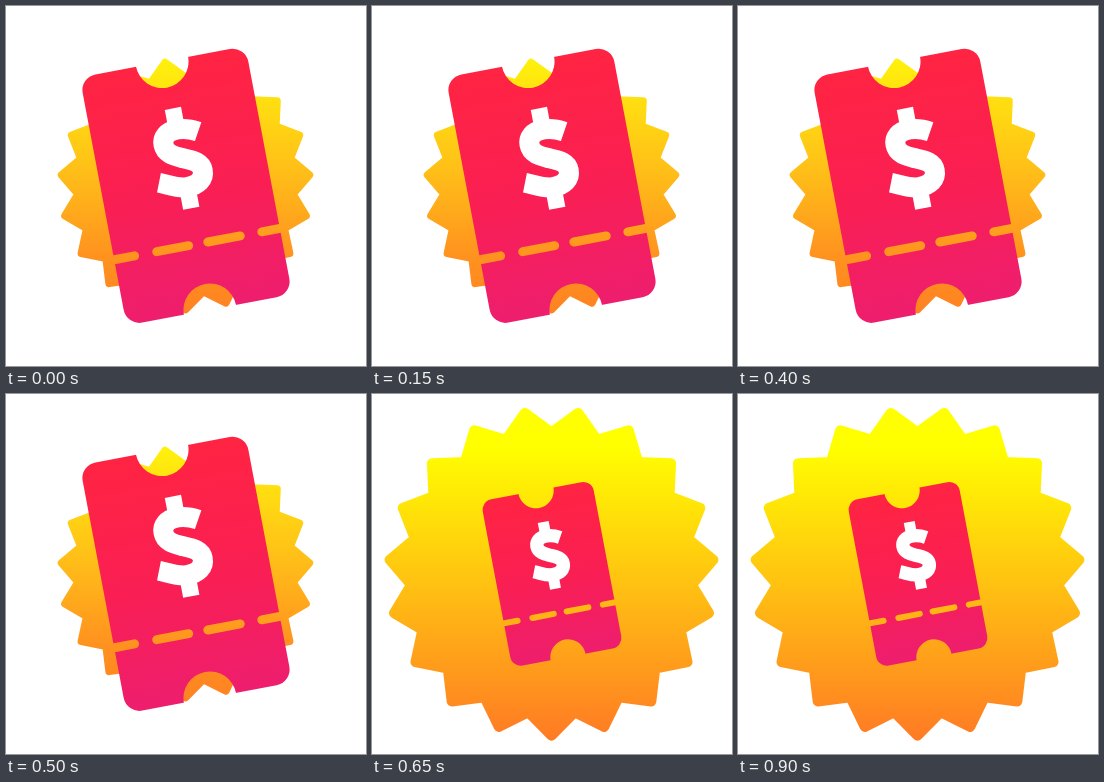
An HTML page for the animation above (1000 ms loop, 360 px wide and 360 px high).

```html
<!DOCTYPE html>
<html lang="en">
<head>
<meta charset="utf-8">
<title>Coupon badge</title>
<style>
  html, body { margin: 0; width: 100%; height: 100%; overflow: hidden; background: #fff; }
  svg { display: block; width: 100vw; height: 100vh; }
</style>
</head>
<body>
<svg viewBox="0 0 360 360">
  <defs>
    <linearGradient id="sun" gradientUnits="userSpaceOnUse" x1="0" y1="-167" x2="0" y2="167">
      <stop offset=".12" stop-color="#ffff00"/>
      <stop offset=".55" stop-color="#ffbf12"/>
      <stop offset="1" stop-color="#ff7a24"/>
    </linearGradient>
    <linearGradient id="dusk" gradientUnits="userSpaceOnUse" x1="0" y1="-167" x2="0" y2="167">
      <stop offset="0" stop-color="#fff20c"/>
      <stop offset=".45" stop-color="#ffbe18"/>
      <stop offset=".78" stop-color="#ff921f"/>
      <stop offset="1" stop-color="#ff8222"/>
    </linearGradient>
    <linearGradient id="pink" gradientUnits="userSpaceOnUse" x1="0" y1="-126" x2="0" y2="126">
      <stop offset="0" stop-color="#ff2442"/>
      <stop offset=".5" stop-color="#fa1f52"/>
      <stop offset="1" stop-color="#ee1e6e"/>
    </linearGradient>
    <mask id="cut" maskUnits="userSpaceOnUse" x="-90" y="-130" width="180" height="260">
      <rect x="-84.3" y="-126.3" width="168.6" height="252.6" rx="16" fill="#fff"/>
      <circle cx="-.5" cy="-126.5" r="26.5"/>
      <circle cx=".5" cy="126.5" r="26.5"/>
      <path d="M-95 59.3H-63.5M-41 59.3H-8.5M11 59.3H44M66 59.3H95"
            stroke="#000" stroke-width="9" stroke-linecap="round"/>
    </mask>
  </defs>
  <path id="badge" stroke-width="10" stroke-linejoin="round"/>
  <g id="ticket">
    <rect x="-90" y="-130" width="180" height="260" fill="url(#pink)" mask="url(#cut)"/>
    <g fill="none" stroke="#fff">
      <path stroke-width="20" d="M22 -51C14 -55.5 8 -57 2 -57C-9 -57 -14.5 -51.5 -14.5 -44.5C-14.5 -35 -6 -31.5 2.5 -27.5C12 -23.5 19.3 -20 19.3 -12C19.3 -3 12 1.5 1 1.5C-8 1.5 -16 -4 -26 -8"/>
      <path stroke-width="16.5" d="M1.5 -78.5V-60M1 4V23"/>
    </g>
  </g>
</svg>
<script>
  const LOOP = 1000, SWITCH = 550, TEETH = 19;
  const POSES = {
    close: { badge: 0.765, ticket: 1, fill: 'url(#dusk)' },
    far: { badge: 1, ticket: 0.67, fill: 'url(#sun)' }
  };
  const badge = document.getElementById('badge');
  const ticket = document.getElementById('ticket');

  // Star outline with one tooth pointing straight down.
  const points = Array.from({ length: TEETH * 2 }, (_, i) => {
    const a = Math.PI * i / TEETH, r = i % 2 ? 141 : 162.5;
    return `${(r * Math.sin(a)).toFixed(2)} ${(r * Math.cos(a)).toFixed(2)}`;
  });
  badge.setAttribute('d', `M${points.join('L')}Z`);

  function render(ms) {
    const pose = ms % LOOP < SWITCH ? POSES.close : POSES.far;
    badge.setAttribute('transform', `translate(179.5 179.2) scale(${pose.badge})`);
    badge.setAttribute('fill', pose.fill);
    badge.setAttribute('stroke', pose.fill);
    ticket.setAttribute('transform', `translate(180 179.8) rotate(-10.7) scale(${pose.ticket})`);
  }

  function tick() {
    render(performance.now());
    requestAnimationFrame(tick);
  }
  render(0);
  requestAnimationFrame(tick);
</script>
</body>
</html>
```
